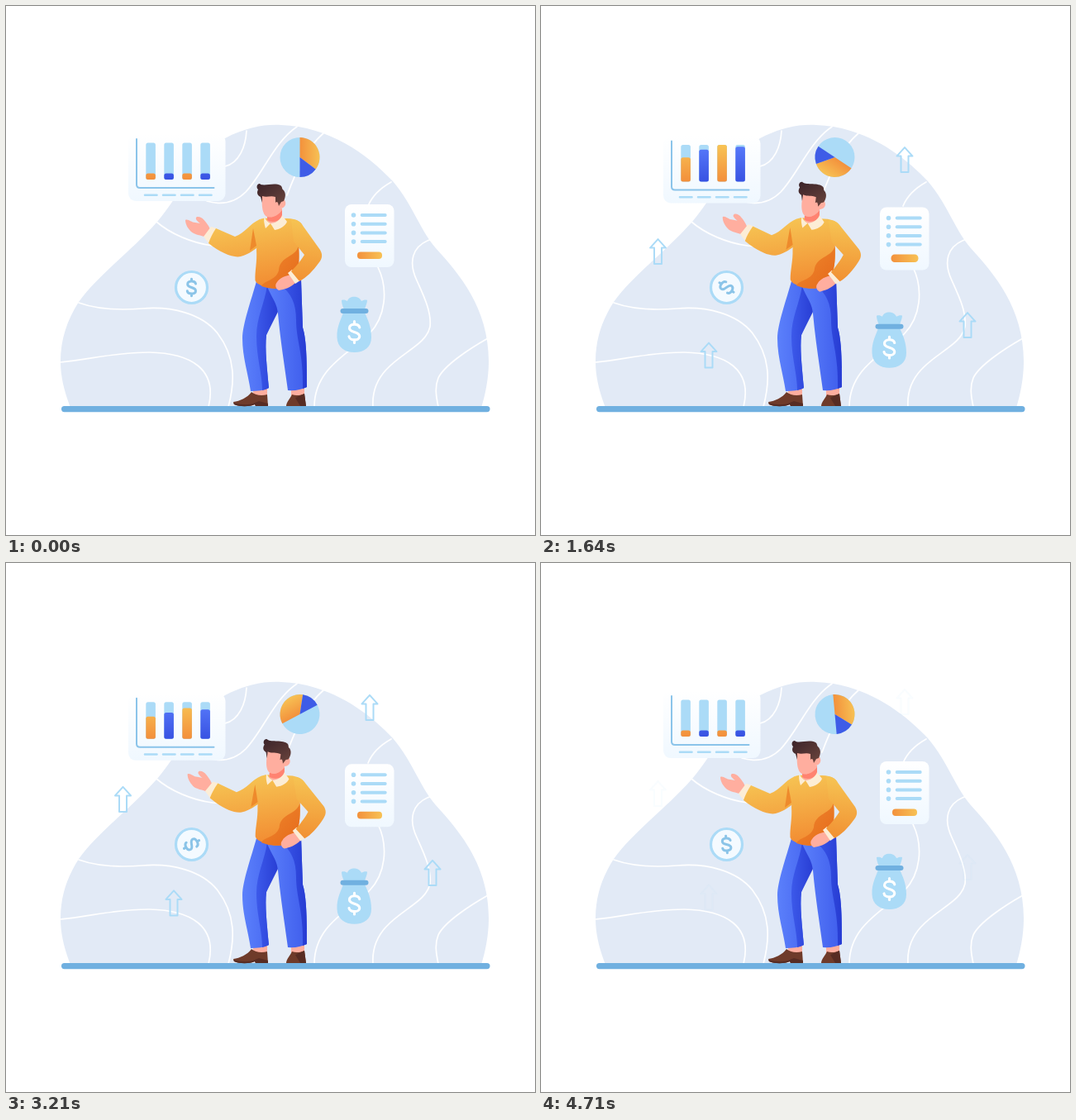
Write an HTML page that moves like this. It is 640 by 640 pixels and loops after 4.78 s.

```html
<!DOCTYPE html>
<html lang="en">
<head>
<meta charset="utf-8">
<title>Business growth</title>
<style>
html, body { margin: 0; height: 100%; overflow: hidden; background: #fff; }
svg { display: block; width: 100vw; height: 100vh; }
.sky { fill: #abdbf7; }
.skin { fill: #ffae9f; }
.cream { fill: #fcedd6; }
.line { fill: none; stroke-linecap: round; stroke-linejoin: round; }
</style>
</head>
<body>
<svg viewBox="0 0 640 640">
  <defs>
    <linearGradient id="card" x2="0" y2="1"><stop stop-color="#fff"/><stop offset="1" stop-color="#f0f8ff"/></linearGradient>
    <linearGradient id="gold"><stop stop-color="#f3913c"/><stop offset="1" stop-color="#f7c154"/></linearGradient>
    <linearGradient id="goldBar" gradientUnits="userSpaceOnUse" x1="0" y1="165" x2="0" y2="210"><stop stop-color="#f8c455"/><stop offset="1" stop-color="#f38f3b"/></linearGradient>
    <linearGradient id="blueBar" gradientUnits="userSpaceOnUse" x1="0" y1="165" x2="0" y2="210"><stop stop-color="#587bfb"/><stop offset="1" stop-color="#3852e2"/></linearGradient>
    <linearGradient id="shirt" gradientUnits="userSpaceOnUse" x1="315" y1="258" x2="328" y2="340"><stop stop-color="#f6c252"/><stop offset="1" stop-color="#f28a31"/></linearGradient>
    <linearGradient id="sleeve" gradientUnits="userSpaceOnUse" x1="362" y1="262" x2="355" y2="332"><stop stop-color="#f6c252"/><stop offset="1" stop-color="#f19133"/></linearGradient>
    <linearGradient id="shade" x2="1" y2="1"><stop stop-color="#f08a2e"/><stop offset="1" stop-color="#e5691b"/></linearGradient>
    <linearGradient id="jeans"><stop stop-color="#5b80fb"/><stop offset="1" stop-color="#3f5dec"/></linearGradient>
    <linearGradient id="denim"><stop stop-color="#3c59ea"/><stop offset="1" stop-color="#263bd2"/></linearGradient>
    <linearGradient id="hair" x2="1" y2="1"><stop stop-color="#3b2329"/><stop offset="1" stop-color="#6b453d"/></linearGradient>
    <path id="dollar" class="line" d="M5 -4.5C4 -8.6 -4.8 -8.6 -4.8 -3.8C-4.8 1 5 -1 5 4.2C5 8.6 -4.6 8.6 -5.2 4.3M0 -10.3V-7.5M0 7.5V10.3"/>
    <path id="arrow" class="sky line" stroke="#abdbf7" stroke-width="2" d="M0 1L9.5 11.5H4.5V31H-4.5V11.5H-9.5Z"/>
  </defs>

  <path fill="#e2eaf6" d="M78 486C70 465 66 448 66 430C66 403 74 380 88 358C113 324 150 298 182 262C215 224 228 182 265 160C290 147 312 143 333 144C390 146 436 178 468 212C492 240 500 270 520 293C548 324 584 365 584 430C584 450 580 470 575 486Z"/>
  <path class="line" stroke="#fff" stroke-width="1.7" d="M66 431C100 428 130 419 173 419C225 420 256 440 245 485
    M88 359C110 367 140 368 165 366C200 363 237 372 256 396C278 425 277 455 269 485
    M182 261C198 275 225 287 250 290L290 292
    M291 151C290 170 282 190 265 194
    M352 146C324 165 311 203 290 225C275 240 257 240 243 236
    M384 154C365 170 352 197 340 229
    M466 213C450 222 442 232 438 242M450 316C463 343 459 376 440 396C418 419 373 437 373 485
    M515 282C490 290 487 311 497 332C505 350 515 370 513 388C508 410 480 418 460 440C446 455 443 470 444 485
    M583 402C560 415 530 435 523 450C518 462 521 475 523 485"/>

  <g id="arrows"></g>

  <g id="chart">
    <rect x="148" y="155" width="117.5" height="81" rx="9" fill="url(#card)"/>
    <path class="line" stroke="#8bc4ea" stroke-width="2" d="M158 161V216Q158 220 162 220H251.500"/>
    <path class="line" stroke="#abdbf7" stroke-width="2.600" d="M168 228.700h14.500M190 228.700h14.500M212 228.700h14.500M234 228.700h14.500"/>
    <g id="bars"></g>
  </g>

  <g id="pie">
    <circle class="sky" r="24"/>
    <path fill="url(#gold)" d="M0 0V-24A24 24 0 0 1 19.200 14.400Z"/>
    <path fill="#3e5ce7" d="M0 0L19.200 14.400A24 24 0 0 1 0 24Z"/>
  </g>

  <g id="doc">
    <rect x="410" y="240" width="59.5" height="76" rx="8" fill="url(#card)"/>
    <g id="rows"></g>
    <rect id="button" x="-15" y="-4.300" width="30" height="8.600" rx="4" fill="url(#gold)"/>
  </g>

  <circle cx="224.500" cy="340.500" r="19" fill="#f4faff" stroke="#abdbf7" stroke-width="3.200"/>
  <use id="coin" href="#dollar" stroke="#8bc4e8" stroke-width="3"/>

  <g id="bag">
    <path class="sky" d="M409 367C407 363 406 359 406 356C409 355 411 356 413 357C415 350 427 350 430 357C432 356 435 355 437 356C437 359 435 363 434 367ZM408 371C405 380 400 388 400.500 401C401 413 410 419 421.500 419C433 419 442 413 442 401C442 388 438 380 434 371Z"/>
    <rect x="404.500" y="366" width="34" height="6" rx="3" fill="#70b0e0"/>
    <use href="#dollar" stroke="#fff" stroke-width="2.500" transform="translate(421.500 394.500) scale(1.250)"/>
  </g>

  <rect x="67" y="484" width="518.500" height="7.200" rx="3.600" fill="#70b0e0"/>

  <path class="skin" d="M299 461h17v11h-17ZM345 461h16v11h-16Z"/>
  <path fill="#6f3b2a" d="M275 479C283 478 292 474 297 467C302 471 309 472 316 470L317 484H302L301 482C295 485 282 485 276 482ZM339 484C339 479 344 475 346 470C351 472 357 471 361 469L363 484Z"/>
  <path fill="#572c23" d="M275 480C285 483 295 483 301 480L306 478L317 481V484H302L301 482C295 485 282 485 276 482ZM350 474L361 469L363 484H356Z"/>
  <path fill="url(#jeans)" d="M303 333C297 355 286 385 286 402C286 425 293 445 296 466C304 466 312 465 318 462C316 440 313 415 315 398L330 364L338 333Z"/>
  <path fill="url(#denim)" d="M316 338C313 360 303 376 303 400C303 425 310 445 310 465Q315 464 318 462C316 440 313 415 315 398L332 364Z"/>
  <path fill="url(#jeans)" d="M314 334C320 352 328 358 329 372C332 405 337 435 341 465Q354 466 364 461C364 435 364 405 359 389L357 331Z"/>
  <path fill="url(#denim)" d="M332 338C345 347 351 360 351 380C351 405 360 420 359 463L364 461C364 435 364 405 359 389L357 331Z"/>

  <g id="body">
    <path class="skin" d="M217 259C220 257 224 262 229 262L235 263C231 260 228 257 231 255C237 254 241 260 245 266L247 270L242 280C236 277 228 277 224 273C220 269 217 264 217 259Z"/>
    <path class="cream" d="M248 267L255 269C250 275 248 281 246 288L239 279Z"/>
    <path fill="url(#shirt)" d="M307 258C294 264 290 274 277 279L254 269C250 275 247 281 245 287C260 299 275 305 284 303C295 300 301 294 306 291Z"/>
    <path fill="url(#shirt)" d="M306 259C310 256 316 257 318 257H340C352 257 360 262 359 269L354 290C355 303 355 315 351 326C345 338 338 342 325 342C312 340 303 337 301.500 332C301 320 304 310 303 295Z"/>
    <path fill="url(#shade)" d="M354 289C352 304 331 302 330 320C326 333 313 331 309 339Q317 342 325 342C338 342 345 338 351 326C355 315 355 303 354 289Z"/>
    <path fill="#ee8a2c" d="M299 269L303 290L295 296Z"/>
    <path class="skin" d="M317 245H334V260L322 265L316 260Z"/>
    <path fill="#ff8371" d="M316 254C322 257 329 254 334 247V256C328 262 320 262 316 259Z"/>
    <path class="cream" d="M313 255C311 259 313 265 314 269L320 263L325 271C332 270 338 266 340 261L334 253C332 259 326 263 320 263C316 261 314 259 313 255Z"/>
    <g id="arm">
      <path class="skin" d="M346 325C338 326 331 329 328 334C325 337 326 342 330 344C336 343 344 341 350 335Z"/>
      <path class="cream" d="M341 323L346 319L356 332L350 336Z"/>
      <path fill="url(#sleeve)" d="M345 258C353 258 357 262 360 267L380 295C383 300 383 305 379 310C371 321 363 329 355 333L345 321C352 314 358 306 361 301L348 285Z"/>
    </g>
    <g id="head">
      <path class="skin" d="M310 229C309 240 310 253 316 255C322 257 328 254 331 245C339 245 340 237 336 234L333 224H312Z"/>
      <path fill="url(#hair)" d="M310 238L308 231C304 229 303 226 305 222C302 219 304 215 307 215C311 219 324 213 332 217C335 219 333 221 336 223C339 227 338 232 336 236L333 237L330 242C329 237 328 236 326 238V231C320 229 316 232 310 230Z"/>
    </g>
  </g>
</svg>

<script>
const LOOP = 4780;
const get = id => document.getElementById(id);
const place = (id, transform) => get(id).setAttribute("transform", transform);
const clamp = x => Math.min(1, Math.max(0, x));
const swell = turns => 1 - Math.cos(turns * 2 * Math.PI);

const barTimes = [0, 860, 1640, 2140, 2790, 3640, 4650, LOOP];
const barLevels = [
  [.17, 1, .66, .73, 1, .2, .17, .17],
  [.17, .82, .87, .6, .9, .52, .17, .17],
  [.17, .33, 1, .74, .72, .96, .17, .17],
  [.17, .17, .95, .95, .6, 1, .17, .17]
];
const arrowSpots = [[440, 172], [141.5, 283], [203, 408.5], [516, 372]];

get("bars").innerHTML = barLevels.map((_, i) => {
  const box = `x="${169.3 + 22 * i}" width="11.6" rx="2.5"`;
  return `<rect class="sky" ${box} y="165.500" height="44.500"/>
    <rect class="level" ${box} fill="url(#${i % 2 ? "blue" : "gold"}Bar)"/>`;
}).join("");
get("rows").innerHTML = [253, 263.7, 274.4, 285.1].map(y =>
  `<circle class="sky" cx="420.500" cy="${y}" r="2.800"/>
   <rect class="sky" x="428.700" y="${y - 2}" width="32" height="4" rx="2"/>`).join("");
get("arrows").innerHTML = arrowSpots.map(([x, y]) =>
  `<use href="#arrow" x="${x}" y="${y}"/>`).join("");
const levels = document.querySelectorAll(".level");

function levelAt(values, t) {
  const k = barTimes.findIndex(time => time > t);
  const u = (t - barTimes[k - 1]) / (barTimes[k] - barTimes[k - 1]);
  return values[k - 1] + (values[k] - values[k - 1]) * swell(u / 2) / 2;
}

function draw(t) {
  const p = t / LOOP;
  const sway = swell(p) / 2;

  place("pie", `translate(355.500 183) rotate(${360 * p})`);
  place("coin", `translate(224.500 340.500) rotate(${360 * p})`);
  place("chart", `translate(0 ${1.8 * swell(2 * p)})`);
  place("doc", `translate(0 ${4.5 * sway})`);
  place("bag", `translate(0 ${24 * sway})`);
  const pulse = swell(clamp((t - 1340) / 600)) / 2;
  place("button", `translate(440 301.800) scale(${1 + .1 * pulse})`);

  place("body", `rotate(${2.5 * sway} 330 338)`);
  place("arm", `rotate(${-6.5 * sway} 350 260)`);
  place("head", `rotate(${7.5 * sway} 325 262)`);

  levels.forEach((bar, i) => {
    const h = 44.5 * levelAt(barLevels[i], t);
    bar.setAttribute("y", 210 - h);
    bar.setAttribute("height", h);
  });

  const entry = 40 * (1 - clamp(t / 620)) ** 2;
  const drift = 10 * swell(clamp((t - 860) / 3920) / 2);
  place("arrows", `translate(0 ${entry - drift})`);
  get("arrows").setAttribute("opacity", clamp(t / 400) * (1 - clamp((t - 4200) / 580)) ** 1.2);
}

function tick() {
  draw(performance.now() % LOOP);
  requestAnimationFrame(tick);
}
tick();
</script>
</body>
</html>
```
